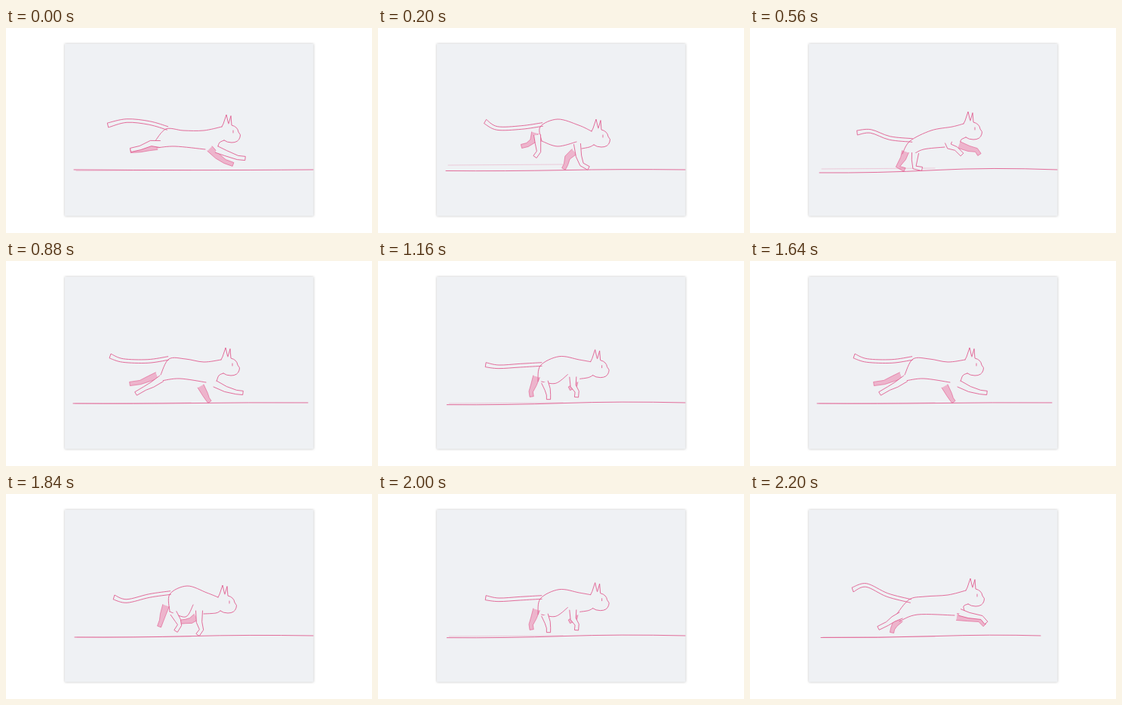
These frames come from a looping animation (485 px wide and 272 px high, 2320 ms). An HTML page:

```html
<!DOCTYPE html>
<html lang="en">
<head>
<meta charset="utf-8">
<title>Running cat</title>
<style>
html, body { margin: 0; width: 100%; height: 100%; overflow: hidden; background: #fff; }
svg { display: block; width: 485px; height: 272px; }
.paper { fill: #eff1f4; filter: drop-shadow(0 0 1.5px rgba(0, 0, 0, .25)); }
path { fill: none; stroke: #e0568b; stroke-width: .85; stroke-linejoin: round; stroke-linecap: round; }
#far { fill: #e8588f; fill-opacity: .4; stroke-opacity: .7; }
#near { fill: #eff1f4; }
#faint { stroke-opacity: .3; }
</style>
</head>
<body>
<svg viewBox="0 0 485 272">
  <rect class="paper" x="78" y="21" width="329.5" height="228.5"/>
  <path id="faint"/><path id="ground"/><path id="far"/><path id="body"/><path id="near"/>
</svg>
<script>
// Every part is a chain of x,y pairs; legs run from hip to toe.
const stretch = {
  head: [292, 115], chest: [281, 157], ground: [90, 188, 407, 189.5],
  tail: [135, 129, 160, 123, 190, 126, 214, 133],
  back: [197, 151, 212, 134, 235, 136, 262, 136],
  belly: [264, 161, 224, 157, 200, 159],
  near: [[204, 154, 192, 153, 178, 159, 165, 162], [279, 161, 291, 166, 307, 172, 317, 173]],
  far: [[200, 157, 190, 159, 178, 162, 165, 163], [270, 160, 280, 170, 290, 177, 301, 181]]
};

const reach = {
  head: [291, 115], chest: [279, 160], ground: [89, 189, 400, 189],
  tail: [138, 126, 155, 132, 188, 133, 215, 129],
  back: [205, 151, 216, 130, 238, 130, 262, 134],
  belly: [265, 161, 230, 156, 206, 159],
  near: [[206, 156, 194, 164, 184, 169, 172, 176], [277, 163, 291, 170, 305, 174, 314, 175]],
  far: [[200, 152, 190, 156, 178, 161, 164, 163], [258, 166, 264, 177, 267, 183, 270, 187]]
};

const land = {
  head: [289, 121], chest: [270, 160], ground: [90, 189.5, 407, 182],
  tail: [142, 124, 158, 133, 190, 132, 218, 128],
  back: [217, 150, 215, 131, 238, 121, 266, 129],
  belly: [263, 151, 238, 157, 217, 150],
  near: [[211, 142, 212, 153, 213, 164, 208, 171], [264, 154, 266, 170, 270, 181, 279, 186]],
  far: [[208, 139, 205, 150, 198, 155, 190, 157], [260, 164, 251, 172, 249, 181, 246, 187]]
};

const gather = {
  head: [287, 121], chest: [262, 159], ground: [91, 190, 407, 190],
  tail: [143, 137, 160, 142, 190, 135, 218, 131],
  back: [217, 156, 217, 133, 240, 122, 266, 131],
  belly: [248, 147, 238, 163, 217, 156],
  near: [[222, 158, 228, 168, 230, 174, 225, 182], [256, 155, 256, 170, 259, 180, 254, 187]],
  far: [[212, 148, 208, 160, 206, 168, 203, 176], [252, 163, 245, 168, 238, 169, 228, 170]]
};

const push = {
  head: [289, 111], chest: [279, 151], ground: [92, 192, 407, 187],
  tail: [142, 139, 160, 137, 185, 146, 215, 149],
  back: [202, 167, 212, 150, 240, 136, 268, 131],
  belly: [258, 158, 230, 161, 216, 168],
  near: [[219, 166, 218, 175, 218, 185, 228, 187], [263, 152, 264, 157, 273, 160, 281, 168]],
  far: [[206, 164, 203, 173, 196, 184, 205, 188], [277, 155, 290, 160, 300, 162, 304, 168]]
};

const leap = {
  head: [292, 112], chest: [285, 157], ground: [94, 190.5, 385, 190],
  tail: [136, 127, 154, 121, 182, 134, 213, 142],
  back: [194, 160, 211, 140, 232, 136, 262, 134],
  belly: [271, 161, 222, 160, 198, 169],
  near: [[200, 161, 190, 166, 182, 172, 170, 178], [278, 157, 290, 161, 307, 164, 313, 171]],
  far: [[199, 166, 192, 173, 189, 179, 188, 184], [274, 163, 289, 165, 304, 167, 311, 174]]
};

// Blends two poses of the same structure.
function mix(a, b, k) {
  if (typeof a === 'number') return a + (b - a) * k;
  if (Array.isArray(a)) return a.map((v, i) => mix(v, b[i], k));
  return Object.fromEntries(Object.keys(a).map(key => [key, mix(a[key], b[key], k)]));
}

const stride = [stretch, reach, land, gather,
  mix(gather, push, 1 / 3), mix(gather, push, 2 / 3), push, leap];

const pairs = flat => flat.flatMap((x, i) => i % 2 ? [] : [[x, flat[i + 1]]]);
const straight = pts => pts.map(p => 'L' + p).join('');

// Curve through all points, without the opening move.
function smooth(pts) {
  return pts.slice(1).map((end, i) => {
    const start = pts[i], before = pts[i - 1] || start, after = pts[i + 2] || end;
    const c1 = start.map((v, k) => v + (end[k] - before[k]) / 6);
    const c2 = end.map((v, k) => v - (after[k] - start[k]) / 6);
    return `C${c1} ${c2} ${end}`;
  }).join('');
}

// Points beside a chain, at the distance width(i).
function side(pts, width) {
  return pts.map(([x, y], i) => {
    const [ax, ay] = pts[i - 1] || pts[i], [bx, by] = pts[i + 1] || pts[i];
    const dx = bx - ax, dy = by - ay, k = width(i) / Math.hypot(dx, dy);
    return [x - dy * k, y + dx * k];
  });
}

function leg(flat) {
  const pts = pairs(flat), width = i => [4.5, 3.7, 2.7, 2.6][i];
  const left = side(pts, width), right = side(pts, i => -width(i)).reverse();
  return 'M' + left[0] + straight(left.slice(1)) + straight(right);
}

function tail(flat) {
  const pts = pairs(flat), width = i => i ? 2.3 : 3;
  const left = side(pts, width).reverse(), right = side(pts, i => -width(i));
  return 'M' + left[0] + smooth(left) + 'L' + right[0] + smooth(right);
}

const line = pts => 'M' + pts[0] + smooth(pts);

function head([x, y]) {
  return `M${x - 6} ${y + 16}l2 -4 4 -12 2.5 11M${x + 3} ${y + 12}l3 -10.5 1 12.5` +
    'q8 2 9 9q4 4 2 7q-2 7 -11 7q-6 0 -10 -3' +
    `M${x + 9} ${y + 21}v3`;
}

function trace(pose) {
  const [x, y] = pose.head, [left, base, right, second] = pose.ground;
  const neck = [x - 6, y + 16], chin = [x - 3, y + 34];
  return {
    ground: `M${left} ${base}Q170 ${base + .6} 245 188.6T${right} 188`,
    faint: `M${left + 3} ${second}L245 ${second - 1}`,
    body: tail(pose.tail) + line([...pairs(pose.back), neck]) + line(pairs(pose.belly)) +
      line([chin, [x - 9, y + 37], pose.chest]) + head(pose.head),
    near: pose.near.map(leg).join(''),
    far: pose.far.map(leg).join('')
  };
}

const drawings = stride.map(trace);
const loop = 2320, tickLength = 40;
// The drawings come evenly but snap to ticks; the last one is held longer.
const starts = Array.from({ length: 24 }, (_, i) =>
  Math.round(i * loop / 24 / tickLength - .01) * tickLength);
starts[23] = 2200;

const layers = [...document.querySelectorAll('path')];
const begin = performance.now();
let shown = -1;

function tick() {
  const t = (performance.now() - begin) % loop;
  const index = starts.filter(s => s <= t).length - 1;
  if (index !== shown) {
    const drawing = drawings[index % drawings.length];
    for (const layer of layers) layer.setAttribute('d', drawing[layer.id]);
    shown = index;
  }
  requestAnimationFrame(tick);
}
tick();
</script>
</body>
</html>
```
